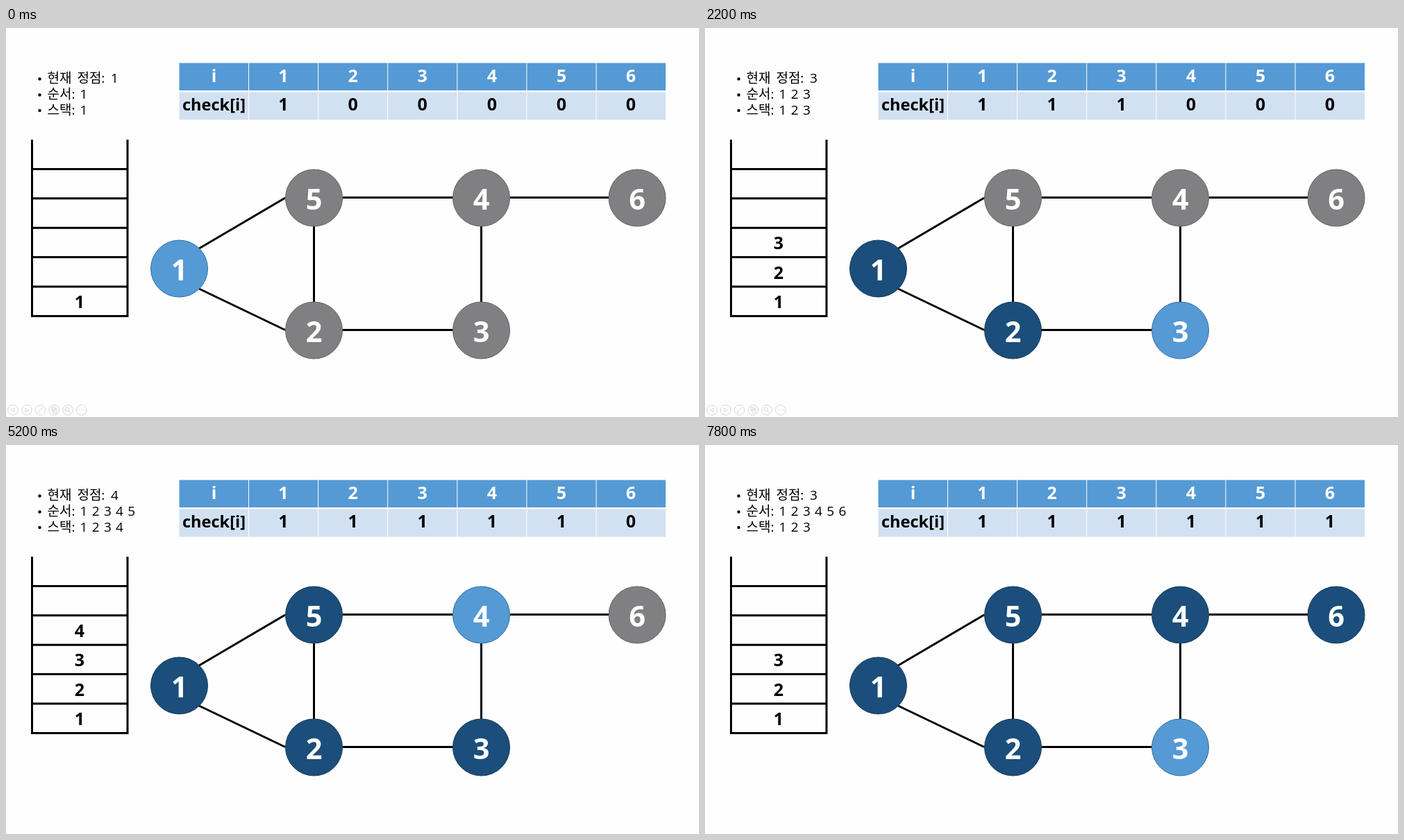
An HTML page that plays this animation: 998 px wide and 561 px high, repeating every 8 s.

```html
<!DOCTYPE html>
<html lang="ko">
<head>
<meta charset="utf-8">
<style>
  html, body { margin: 0; width: 100%; height: 100%; overflow: hidden; background: #fefefe; }
  svg { display: block; width: 998px; height: 561px; }
  text { font-family: "Open Sans", "Noto Sans CJK KR", "Noto Sans CJK", sans-serif; }
  .note { font-size: 19px; word-spacing: 1.4px; }
  .bold { font-size: 25px; font-weight: 700; text-anchor: middle; }
  .head, .num { fill: #fff; }
  .num { font-size: 41.5px; }
  .line { stroke: #000; stroke-width: 3; fill: none; }
  .rule { stroke: #fefefe; stroke-width: 1; }
  .tools { fill: none; stroke: #d6d6d6; stroke-width: 1; }
</style>
</head>
<body>
<svg id="stage" viewBox="0 0 998 561"></svg>
<script>
const LOOP = 8000;
const GRAY = ['#807f81', '#636264'], BLUE = ['#559ad5', '#356f9f'], NAVY = ['#1b4e7a', '#163a5a'];
const NODES = [[249.5, 347], [443.5, 436], [684.5, 436], [684.5, 245], [443.5, 245], [909, 245]];
const EDGES = 'M278 318L402 245M278 376L402 435.5M485 244.5H643M726 244.5H868M485 435.5H643M443.5 286V395M684.5 286V395';

// Each step: start time, current vertex, visit order, listed stack, drawn stack
const STEPS = [
  [0, 1, '1', '1', '1'],
  [1000, 2, '12', '12', '12'],
  [2000, 3, '123', '123', '123'],
  [3000, 4, '1234', '1234', '1234'],
  [4000, 5, '12345', '12345', '12345'],
  [5000, 4, '12345', '1234', '1234'],
  [6000, 6, '123456', '1234', '12346'],
  [7000, 4, '123456', '1234', '1234'],
  [7800, 3, '123456', '123', '123']
];
const TOOLS_END = 3000;

const stage = document.getElementById('stage');

function add(tag, attrs, content = '', parent = stage) {
  const el = document.createElementNS('http://www.w3.org/2000/svg', tag);
  for (const key in attrs) el.setAttribute(key, attrs[key]);
  el.textContent = content;
  parent.appendChild(el);
  return el;
}
const label = (x, y, cls, content) => add('text', { x, y, class: cls }, content);
const spaced = digits => [...digits].join(' ');

// Notes
const notes = [['현재 정점:', 79, 151], ['순서:', 102, 106.5], ['스택:', 124.5, 106.5]].map(([name, y, x]) => {
  add('circle', { cx: 48.5, cy: y - 5.5, r: 2.2 });
  label(59.5, y, 'note', name).style.wordSpacing = '3px';
  return label(x, y, 'note');
});

// Table
add('rect', { x: 249.5, y: 50.5, width: 700.5, height: 39.5, fill: BLUE[0] });
add('rect', { x: 249.5, y: 92.5, width: 700.5, height: 40, fill: '#d2e1f2' });
label(299.5, 78, 'bold head', 'i');
label(299.5, 119, 'bold', 'check[i]').style.fontSize = '23.6px';
const checks = NODES.map((_, i) => {
  const x = 349.5 + i * 100.1;
  add('path', { d: `M${x} 50V133`, class: 'rule' });
  label(x + 50, 78, 'bold head', i + 1);
  return label(x + 50, 119, 'bold');
});

// Stack
add('path', { d: 'M37.5 161V415.5H175V161', class: 'line' });
const slots = [0, 1, 2, 3, 4].map(i => {
  const y = 373 - i * 42.4;
  add('path', { d: `M37.5 ${y}H175`, class: 'line' });
  return label(106, y + 31, 'bold');
});

// Graph
add('path', { d: EDGES, class: 'line' });
const discs = NODES.map(([cx, cy], i) => {
  const disc = add('circle', { cx, cy, r: 41 });
  label(cx, cy + 16.5, 'bold num', i + 1);
  return disc;
});

// Presenter buttons
const tools = add('g', { class: 'tools' });
for (let i = 0; i < 6; i++) add('circle', { cx: 10 + i * 19.75, cy: 551, r: 7.3 }, '', tools);
add('path', {
  d: 'M12 548L7.5 551L12 554ZM28 548L32.5 551L28 554ZM46 554L53 547M45.5 555L48 554' +
     'M66 547H71V552H66ZM68 549.5H73V555H68ZM90 552L93 555M105 551H106.5M108 551H109.5M111 551H112.5'
}, '', tools);
add('circle', { cx: 88, cy: 550, r: 2.7 }, '', tools);

function show([, current, order, listed, drawn]) {
  [String(current), spaced(order), spaced(listed)].forEach((value, i) => notes[i].textContent = value);
  slots.forEach((slot, i) => slot.textContent = drawn[i] || '');
  discs.forEach((disc, i) => {
    const seen = order.includes(i + 1);
    const [fill, edge] = i + 1 === current ? BLUE : seen ? NAVY : GRAY;
    disc.setAttribute('fill', fill);
    disc.setAttribute('stroke', edge);
    checks[i].textContent = seen ? 1 : 0;
  });
}

let shown;
function tick() {
  const time = performance.now() % LOOP;
  const step = STEPS.findLast(([start]) => start <= time);
  if (step !== shown) {
    show(shown = step);
    tools.style.display = time < TOOLS_END ? '' : 'none';
  }
  requestAnimationFrame(tick);
}
tick();
</script>
</body>
</html>
```
